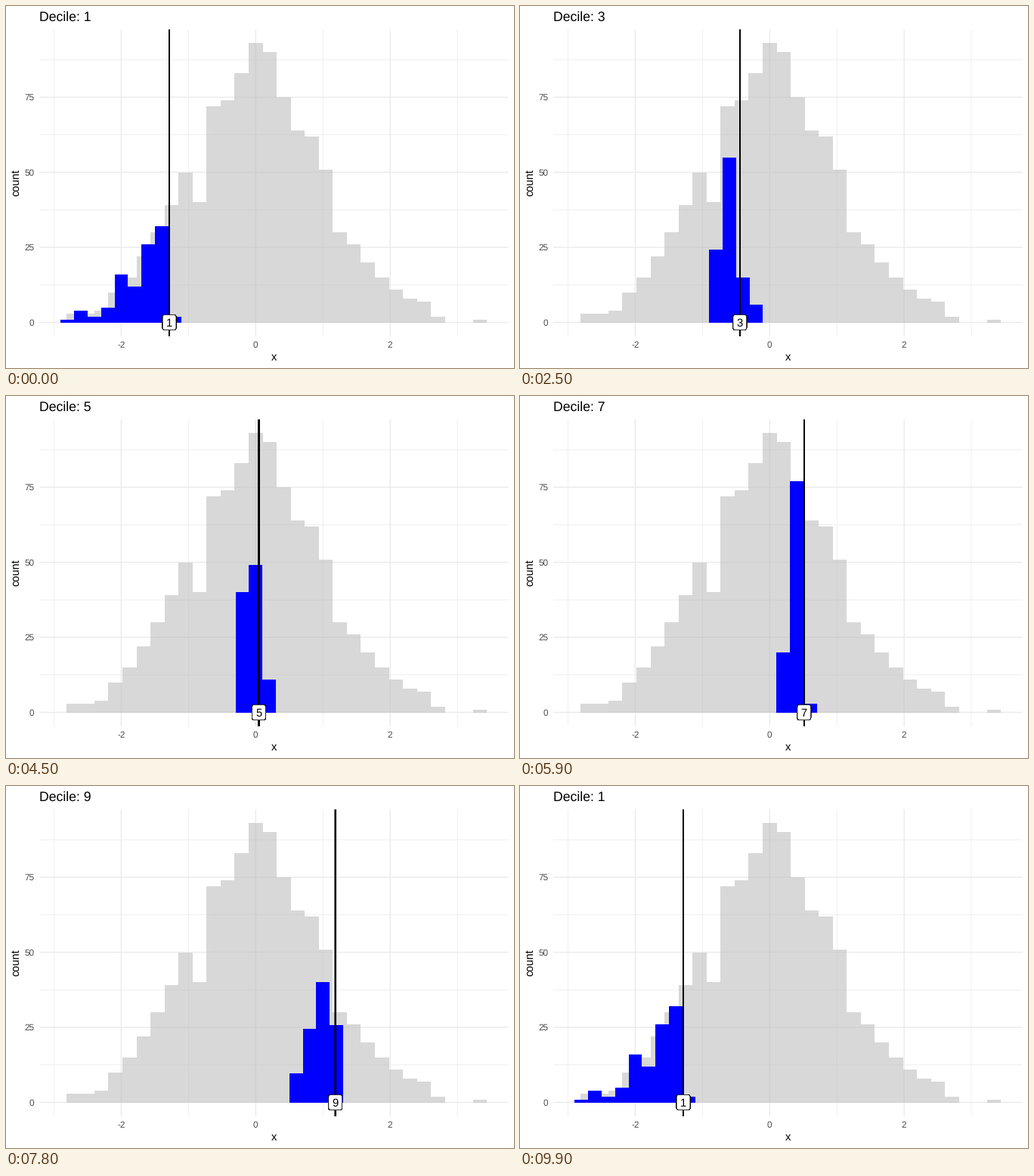
A matplotlib script for the animation above (10 s loop, 672 by 480 pixels).

```python
import math
import numpy as np
import matplotlib.pyplot as plt
from matplotlib.animation import FuncAnimation
from matplotlib.patches import FancyBboxPatch
from matplotlib.patheffects import Normal

plt.rcParams["font.family"] = "Liberation Sans"
plt.rcParams["text.hinting"] = "none"

W, H, DPI = 672, 480, 96
LEFT, RIGHT, TOP, BOTTOM = 44.2, 664.67, 31.0, 438.0
Y0, Y_UNIT = 419.5, 3.98
LINE, THIN = 1.42, 0.71  # line widths in pixels
FRAMES, GROUPS = 100, 10
REST, TRAVEL = 4, 6  # frames a decile rests at most, and moves at least


def normal_sample(seed, n):
    """Normal values by inversion, from a congruentially seeded twister."""
    keys = []
    for _ in range(50 + 625):
        seed = (69069 * seed + 1) % 2**32
        keys.append(seed)
    twister = np.random.MT19937(0)
    twister.state = {"bit_generator": "MT19937",
                     "state": {"key": np.array(keys[-624:], dtype=np.uint32),
                               "pos": 624}}
    u = (twister.random_raw(2 * n) / 2**32).reshape(n, 2)
    big = 2**27
    p = (np.floor(big * u[:, 0]) + u[:, 1]) / big
    z = np.linspace(-5, 5, 20001)
    cdf = [0.5 * math.erfc(-v / math.sqrt(2)) for v in z]
    return np.interp(p, cdf, z)


# One sample feeds the background, the deciles and their upper bounds.
data = np.sort(normal_sample(123, 1000))
deciles = data.reshape(GROUPS, -1)
bounds = deciles.max(axis=1)


def centred_edges(width):
    """Bin edges covering the data, with one bin centred on zero."""
    first = math.floor(data[0] / width + 0.5) - 0.5
    last = math.ceil(data[-1] / width - 0.5) + 0.5
    return width * np.arange(first, last + 0.5)


wide_edges = centred_edges(np.ptp(data) / 29)
edges = centred_edges(0.2)
totals = np.histogram(data, wide_edges)[0]
counts = [np.histogram(d, edges)[0] for d in deciles]

# The panel leaves a margin of 5% on both sides of the bars.
x_min = min(edges[0], wide_edges[0])
x_max = max(edges[-1], wide_edges[-1])
X_UNIT = (RIGHT - LEFT) / (1.1 * (x_max - x_min))
X0 = LEFT + X_UNIT * (0.05 * (x_max - x_min) - x_min)


def px(x):
    return X0 + X_UNIT * x


def py(y):
    return Y0 - Y_UNIT * y


def pt(pixels):
    return pixels * 72 / DPI


fig = plt.figure(figsize=(W / DPI, H / DPI), dpi=DPI, facecolor="white")
ax = fig.add_axes([0, 0, 1, 1])


def segment(xs, ys, width, color, z):
    return ax.plot(xs, ys, color=color, lw=pt(width), zorder=z, snap=False,
                   solid_capstyle="butt")[0]


def histogram(sides, heights, z, **style):
    return ax.bar(px(sides[:-1]), -Y_UNIT * heights, X_UNIT * np.diff(sides),
                  bottom=Y0, align="edge", linewidth=0, antialiased=False,
                  zorder=z, **style)


def write(x, y, text, size, color="black", ha="center", **kw):
    return ax.text(x, y, text, fontsize=size, color=color, ha=ha,
                   va="baseline", **kw)


# Grid lines alternate between major (even steps) and minor (odd steps).
for i in range(8):
    major = i % 2 == 0
    y = py(12.5 * i)
    segment([LEFT, RIGHT], [y, y], LINE if major else THIN, "#EBEBEB", 1)
    if major:
        write(37.4, y + 4.1, f"{12.5 * i:.0f}", 8.8, "#4D4D4D", ha="right")
for v in range(-3, 4):
    major = v % 2 == 0
    x = px(v)
    segment([x, x], [TOP, BOTTOM], LINE if major else THIN, "#EBEBEB", 1)
    if major:
        write(x, 453, str(v), 8.8, "#4D4D4D")

write((LEFT + RIGHT) / 2, 469.7, "x", 11)
write(17.3, (TOP + BOTTOM) / 2, "count", 11, rotation=90,
      rotation_mode="anchor")
title = write(LEFT, 20, "", 13.2, ha="left")

histogram(wide_edges, totals, 2, color="#BEBEBE", alpha=0.6)
bars = histogram(edges, counts[0], 3, color="#0000FF")

# The marker is painted many times over, which hardens its soft edges.
overpaint = [Normal()] * 30
marker = segment([0, 0], [TOP, BOTTOM], LINE, "black", 4)
marker.set_path_effects(overpaint)
PAD, DIGIT, TEXT_H = 4.8, 8.19, 10.6
box = FancyBboxPatch((0, 0), 1, 1, boxstyle="round,pad=0,rounding_size=3.4",
                     facecolor="white", edgecolor="black", lw=pt(THIN),
                     zorder=5, path_effects=overpaint)
ax.add_patch(box)
label = write(0, Y0 + TEXT_H / 2, "", 11.04, zorder=6)

ax.set_xlim(0, W)
ax.set_ylim(H, 0)
ax.axis("off")


def arrival(i):
    """Frame at which the move away from decile i is complete."""
    return round((FRAMES - 1) * (i + 1) / GROUPS) if i >= 0 else -1


def pose(frame):
    """Return the current decile, the next one and the progress between."""
    i = 0
    while i < GROUPS - 1 and frame >= arrival(i):
        i += 1
    end = arrival(i)
    start = min(arrival(i - 1) + REST, end - TRAVEL)
    return i, (i + 1) % GROUPS, max(0, frame - start) / (end - start)


def update(frame):
    a, b, t = pose(frame)
    for bar, n in zip(bars, (1 - t) * counts[a] + t * counts[b]):
        bar.set_height(-Y_UNIT * n)

    name = str((b if t >= 0.5 else a) + 1)
    x = px((1 - t) * bounds[a] + t * bounds[b])
    width = DIGIT * len(name) + 2 * PAD
    height = TEXT_H + 2 * PAD
    marker.set_xdata([x, x])
    box.set_bounds(x - width / 2, Y0 - height / 2, width, height)
    label.set_x(x)
    label.set_text(name)
    title.set_text(f"Decile: {name}")
    return [*bars, marker, box, label, title]


anim = FuncAnimation(fig, update, frames=FRAMES, interval=100, repeat=True,
                     repeat_delay=0, blit=False)
plt.show()
```
